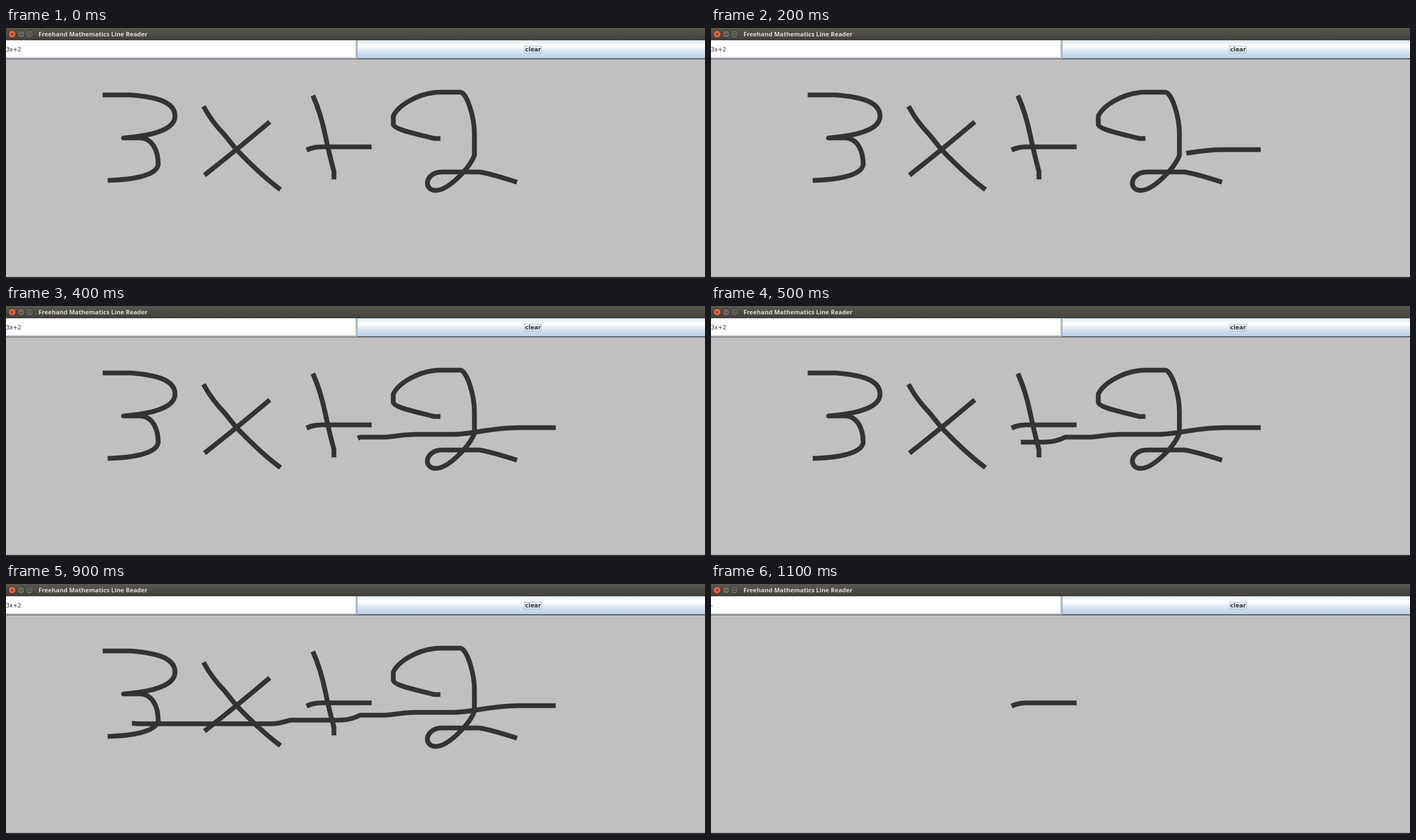
An HTML page that plays this animation: 1249 by 448 pixels, repeating every 1.6 s.

```html
<!DOCTYPE html>
<html lang="en">
<head>
<meta charset="utf-8">
<style>
html, body { margin: 0; width: 100%; height: 100%; overflow: hidden; background: #c0c0c0; }
svg { display: block; }
.ui { font: 10px "DejaVu Sans", sans-serif; fill: #333; }
.label { font-weight: bold; text-anchor: middle; }
.title { font: bold 11px "Open Sans", sans-serif; fill: #dfdbd2; }
.ink path { fill: none; stroke: #333; stroke-width: 8.6; stroke-linecap: square; stroke-linejoin: round; }
</style>
</head>
<body>
<svg width="1249" height="448" viewBox="0 0 1249 448">
  <defs>
    <linearGradient id="bar" x2="0" y2="1">
      <stop stop-color="#5a5950"/><stop offset="1" stop-color="#3f3e39"/>
    </linearGradient>
    <linearGradient id="button" x2="0" y2="1">
      <stop stop-color="#dde8f3"/><stop offset=".3" stop-color="#fff"/>
      <stop offset=".6" stop-color="#dce7f2"/><stop offset="1" stop-color="#b8cfe5"/>
    </linearGradient>
  </defs>
  <rect width="1249" height="448" fill="#c0c0c0"/>

  <rect width="1249" height="22" fill="url(#bar)"/>
  <g stroke="#33322e">
    <circle cx="11" cy="11" r="6.5" fill="#ea6238"/>
    <circle cx="27" cy="11" r="6.5" fill="#6b6960"/>
    <circle cx="42" cy="11" r="6.5" fill="#6b6960"/>
    <path d="M9 9l4 4m0-4l-4 4M24 11.5h6M39.5 8.5h5v5h-5z" fill="none"/>
  </g>
  <text class="title" x="58" y="15">Freehand Mathematics Line Reader</text>

  <rect y="22" width="1249" height="33" fill="#eee"/>
  <rect y="22" width="625" height="31" fill="#fff"/>
  <path d="M0 53.5H625.5V22" fill="none" stroke="#7a8a99"/>
  <text class="ui" id="result" x="0" y="42"></text>
  <rect x="627" y="22" width="622" height="32" fill="url(#button)"/>
  <path d="M627.5 22V54.5H1249" fill="none" stroke="#7a8a99"/>
  <rect x="926.5" y="32.5" width="30" height="13" fill="none" stroke="#a3b8cc"/>
  <text class="ui label" x="941.7" y="42">clear</text>
  <rect y="55" width="1249" height="1" fill="#33383e"/>
  <rect y="446" width="1249" height="2" fill="#3c3b37"/>

  <g class="ink">
    <g id="erasable">
      <path d="M177 120H222C262 123 302 130 302 158C302 185 250 194 210 197H240C262 198 272 220 272 245C268 266 220 272 186 273"/>
      <path d="M355 144Q368 168 391 192L411 217Q455 263 487 287M468 171Q415 216 358 261"/>
      <path d="M550 125Q562 152 570 190T586 257V267"/>
      <path d="M772 198H765C735 190 692 182 692 172V158C700 140 735 116 775 115H812C824 117 837 160 837 190V228C828 252 790 291 768 291C745 291 748 258 780 258H845Q862 260 909 275"/>
      <path id="strike" pathLength="837" d="M978 218H916C865 218 835 230 800 230H730C700 231 690 235 675 235H633C615 244 600 244 590 244H508C490 249 485 250.5 470 250.5H236L190 246L175 243H141"/>
    </g>
    <path d="M541 217Q550 213 566 213H645L649 213"/>
  </g>
</svg>
<script>
const $ = id => document.getElementById(id);
const CLEAR_TICK = 11;

// The pen's pace: [tick, length drawn], even speed in between.
const pace = [[0, 0], [2, 124], [4, 345], [7, 572], [10, 837]];

function drawnLength(tick) {
  const i = Math.max(1, pace.findIndex(([at]) => at >= tick));
  const [t0, from] = pace[i - 1], [t1, to] = pace[i];
  return from + (to - from) * (tick - t0) / (t1 - t0);
}

function draw() {
  const tick = Math.floor(performance.now() % 1600 / 100);
  const cleared = tick >= CLEAR_TICK;
  $('result').textContent = cleared ? '-' : '3x+2';
  $('erasable').style.display = cleared ? 'none' : '';
  $('strike').style.display = tick ? '' : 'none';
  if (!cleared) $('strike').setAttribute('stroke-dasharray', `${drawnLength(tick)} 2000`);
  requestAnimationFrame(draw);
}
draw();
</script>
</body>
</html>
```
